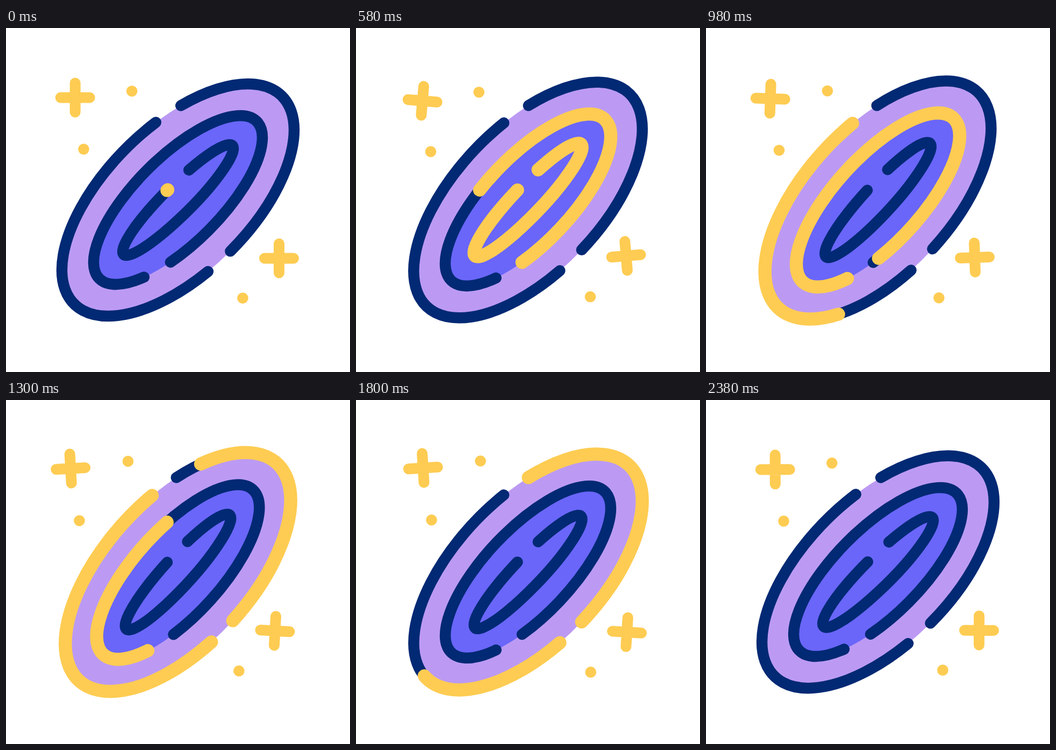
Recreate the animation shown at these times as an HTML page. Size 640 px wide and 640 px high, loop 2.4 s.

```html
<!DOCTYPE html>
<html lang="en">
<head>
<meta charset="utf-8">
<title>Galaxy</title>
<style>
  html, body { margin: 0; height: 100%; overflow: hidden; background: #fff; }
  svg { display: block; width: 100vw; height: 100vh; }
  .dark, .glow, .plus { fill: none; stroke-linecap: round; }
  .dark { stroke: #022974; stroke-width: 20.5; }
  .glow { stroke: #fecc52; stroke-width: 24.5; }
  .plus { stroke: #fecc52; stroke-width: 20; }
  .dot { fill: #fecc52; }
</style>
</head>
<body>
<svg viewBox="0 0 640 640">
  <g id="galaxy">
    <ellipse rx="273.4" ry="136.3" fill="#bc9af3"/>
    <ellipse rx="207" ry="80.2" fill="#6a66f9"/>
  </g>
  <g id="sparkles"></g>
</svg>
<script>
const LOOP = 2400;
const galaxy = document.getElementById('galaxy');
const sparkles = document.getElementById('sparkles');

function add(parent, tag, attrs) {
  const el = document.createElementNS('http://www.w3.org/2000/svg', tag);
  for (const key in attrs) el.setAttribute(key, attrs[key]);
  return parent.appendChild(el);
}

// Elliptical arc running counterclockwise between two angles in degrees
function arcPath(a, b, from, to) {
  const point = deg => {
    const r = deg * Math.PI / 180;
    return `${a * Math.cos(r)} ${b * Math.sin(r)}`;
  };
  return `M${point(from)}A${a} ${b} 0 ${from - to > 180 ? 1 : 0} 0 ${point(to)}`;
}

// Spiral arms from the inside out; the light runs through them in this order
const arms = [
  [143.1, 27, -90, -428],
  [207, 80.2, 116.3, -225.1],
  [273.4, 136.3, -74.5, -258.5],
  [273.4, 136.3, 89.7, -62.1],
].map(arm => arcPath(...arm));

arms.forEach(d => add(galaxy, 'path', { d, class: 'dark' }));
let total = 0;
const glows = arms.map(d => {
  const el = add(galaxy, 'path', { d, class: 'glow' });
  const glow = { el, start: total, length: el.getTotalLength() };
  total += glow.length;
  return glow;
});

// Drift of each sparkle, and tilt of the crosses, at these times
const times = [0, 580, 980, 1300, 1580, 2020];
const tilt = [0, 4.85, 2, -3.25, -4.75, -2.05];
const items = [
  { x: 128.7, y: 129.5, spin: 1, dx: [0, -5, -9, -8.5, -6, -2], dy: [0, 6, 2, -2, -3.5, -2] },
  { x: 508, y: 428.5, spin: -1, dx: [0, -5.5, -8, -7.5, -6, -2], dy: [0, -4.5, -1.5, 1, 2.5, 3.5] },
  { x: 234.2, y: 117.5, dx: [0, -5.5, -8.3, -7.2, -4.7, -1], dy: [0, 2, -0.5, -3.5, -4.5, -3] },
  { x: 144.5, y: 225.5, dx: [0, -5.5, -8.5, -8, -6, -2], dy: [0, 4.5, 2, -1, -2, -2] },
  { x: 440.4, y: 502.5, dx: [0, -4.5, -7, -7, -6, -1.5], dy: [0, -2.5, -0.5, 1.5, 3.5, 3.5] },
];
for (const item of items) {
  item.el = item.spin
    ? add(sparkles, 'path', { d: 'M-27 0H27M0-27V27', class: 'plus' })
    : add(sparkles, 'circle', { r: 10.3, class: 'dot' });
}

// Smooth periodic curve through the values
function curve(values, t) {
  const n = times.length;
  const time = i => times[(i + n) % n] + LOOP * Math.floor(i / n);
  const value = i => values[(i + n) % n];
  const slope = i => (value(i + 1) - value(i - 1)) / (time(i + 1) - time(i - 1));
  let i = 0;
  while (time(i + 1) <= t) i++;
  const span = time(i + 1) - time(i);
  const p = (t - time(i)) / span;
  const q = 1 - p;
  return q * q * (1 + 2 * p) * value(i) + p * p * (1 + 2 * q) * value(i + 1)
    + p * q * span * (q * slope(i) - p * slope(i + 1));
}

function draw(now) {
  const t = now % LOOP;
  const turn = 3 * (1 - Math.abs(t / 1200 - 1));
  galaxy.setAttribute('transform', `translate(320 320) rotate(${-45 - turn})`);

  const head = total * t / 1327;
  const tail = total * (t - 622) / 1703;
  for (const { el, start, length } of glows) {
    const clamp = s => Math.min(Math.max(s - start, 0), length);
    const from = clamp(tail);
    const size = clamp(head) - from;
    el.style.display = size > 0 ? '' : 'none';
    el.setAttribute('stroke-dasharray', `${size} ${2 * length}`);
    el.setAttribute('stroke-dashoffset', -from);
  }

  for (const { el, x, y, dx, dy, spin = 0 } of items) {
    const px = x + curve(dx, t);
    const py = y + curve(dy, t);
    el.setAttribute('transform', `translate(${px} ${py}) rotate(${spin * curve(tilt, t)})`);
  }
}

const begin = performance.now();
function tick() {
  draw(performance.now() - begin);
  requestAnimationFrame(tick);
}
tick();
</script>
</body>
</html>
```
